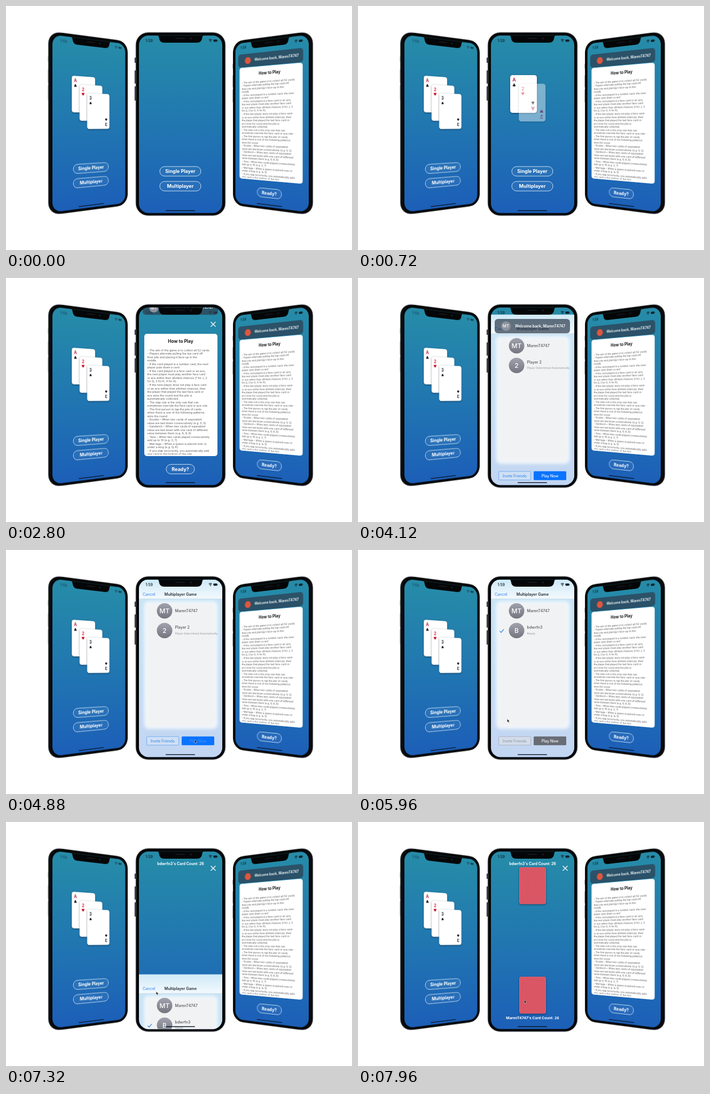
Write an HTML page that moves like this. It is 648x459 px and loops after 8000 ms.

```html
<!DOCTYPE html>
<html lang="en">
<head>
<meta charset="utf-8">
<title>Card game on three phones</title>
<style>
  html, body { margin: 0; width: 100%; height: 100%; overflow: hidden; background: #fff; }
  svg { position: absolute; left: 0; top: 0; width: 168px; height: 344px; overflow: visible; transform-origin: 0 0; }
  text { font-family: Inter, sans-serif; white-space: pre; }
  .suit { font-family: "DejaVu Sans", sans-serif; }
  .card { filter: drop-shadow(.5px 1px 1.8px rgba(0, 15, 40, .6)); }
</style>
</head>
<body>
<script>
const LOOP = 8000;
const USER = 'MarenT4747', RIVAL = 'bdwrfn3';
const RULES = `- The aim of the game is to collect all 52 cards.
- Players alternate pulling the top card off
their pile and placing it face-up in the
middle
- If the card played is a number card, the next
player puts down a card.
- If the card played is a face card or an ace,
the next player must play another face card
or ace within their allotted chances (1 for J, 2
for Q, 3 for K, 4 for A).
- If the next player does not play a face card
or an ace within their allotted chances, then
the player that played the last face card or
ace wins the round and the pile is
automatically collected.
- The slap rule is the only rule that can
sometimes override the face card or ace rule.
- The first person to tap the pile of cards
when there is one of the following patterns
wins the round:
- Double – When two cards of equivalent
value are laid down consecutively (e.g. 5, 5)
- Sandwich – When two cards of equivalent
value are laid down with one card of different
value between them (e.g. 6, 8, 6)
- Tens – When two cards played consecutively
add up to 10 (e.g. 3, 7)
- Marriage – When a queen is placed over or
under a king (e.g. Q, K)
- If you slap incorrectly, you automatically add
one card to the bottom of the pile`.split('\n');

// Drawing helpers. All screens share the coordinates of the middle phone.
const text = (x, y, size, str, fill = '#fff', weight = 400, anchor = 'middle', extra = '') =>
  `<text x="${x}" y="${y}" font-size="${size}" fill="${fill}" font-weight="${weight}" text-anchor="${anchor}" ${extra}>${str}</text>`;
const rect = (x, y, w, h, r, fill, extra = '') =>
  `<rect x="${x}" y="${y}" width="${w}" height="${h}" rx="${r}" fill="${fill}" ${extra}/>`;
const group = (id, content) => `<g id="${id}">${content}</g>`;
const lowered = (dy, content) => `<g transform="translate(0 ${dy})">${content}</g>`;

const pill = (cy, w, label, size) =>
  rect(326.5 - w / 2, cy - 9, w, 18, 9, '#fff', 'fill-opacity=".05" stroke="#dcecfa" stroke-width=".9"') +
  text(326.5, cy + 3.1, size, label, '#fff', 700);

function card(i, rank, suit, rankColor, suitColor) {
  const x = 285 + 16.2 * i, y = 130 + 16.3 * i;
  const mark = text(x + 7.5, y + 12.3, 8.8, rank, rankColor, 600) +
    text(x + 7.5, y + 22, 8.2, suit, suitColor, 400, 'middle', 'class="suit"');
  return `<g class="card">${rect(x, y, 50, 71, 4.5, '#fff')}${mark}
    <g transform="rotate(180 ${x + 25} ${y + 35.5})">${mark}</g></g>`;
}
const cards = [
  card(0, 'A', '♣', '#b01c38', '#111'),
  card(1, '2', '♥', '#c8142f', '#d0142e'),
  card(2, '3', '♠', '#15202a', '#111')
];
const menuButtons = pill(311, 77, 'Single Player', 8.9) + pill(339, 77, 'Multiplayer', 9);

const closeIcon = '<path d="M383.5 82.5l9 9m0-9l-9 9" stroke="#fff" stroke-width="1.3"/>';
const rules = rect(259, 105, 137, 230, 5, '#fff') +
  text(327, 122.3, 8.3, 'How to Play', '#1c1c1e', 700) +
  `<g clip-path="url(#page)">` +
  RULES.map((line, i) => text(264.6, 137.8 + 6.52 * i, 5.3, line, '#58585c', 400, 'start')).join('') +
  '</g>' + pill(359.5, 53, 'Ready?', 9);

const banner = icon => rect(256, 77, 141, 27, 6, '#2f3d4f', 'fill-opacity=".72"') + icon +
  text(294, 92.8, 6.9, `Welcome back, ${USER}`, '#fff', 600, 'start');
const smallAvatar = '<circle cx="277" cy="90.5" r="9" fill="#8d929c"/>' + text(277, 93.3, 7.6, 'MT', '#fff', 500);
const plainBadge = '<circle cx="278.5" cy="91" r="7" fill="#e0563c"/>';

const avatar = (cy, label, id) => `<circle cx="297" cy="${cy}" r="14.5" fill="url(#grey)"/>` +
  text(297, cy + 4.3, 12, label, '#fff', 500, 'middle', `id="${id}"`);
const lobby = rect(249, 56, 156, 334, 0, 'url(#haze)') +
  rect(261, 99, 133, 235, 6, '#f1f2f3', 'stroke="#f8fcff" stroke-width="4" filter="url(#soft)"') +
  rect(249, 56, 156, 36, 0, 'url(#nav)') +
  rect(249, 91.7, 156, .5, 0, '#b4c6d6') +
  text(256, 85.5, 7.2, 'Cancel', '#2f82e8', 400, 'start') +
  text(327, 85.5, 7.1, 'Multiplayer Game', '#22282e', 600) +
  avatar(114.5, 'MT', 'hostInitials') + avatar(151.5, '2', 'guestInitials') +
  text(316.5, 117, 7.1, USER, '#54565a', 500, 'start') +
  text(316.5, 148, 7.1, '', '#54565a', 500, 'start', 'id="guestName"') +
  text(316.5, 158.5, 5.2, '', '#96989d', 400, 'start', 'id="guestNote"') +
  '<path id="check" d="M265.5 152.5l2.5 2.6 5-6" fill="none" stroke="#277ff0" stroke-width="1.3"/>' +
  rect(263.5, 351, 60, 16, 1.5, '#cfe0f5', 'id="inviteBox" stroke-width=".8"') +
  text(293.5, 361.7, 7.1, 'Invite Friends', '#2f82e8', 400, 'middle', 'id="inviteText"') +
  rect(329, 350.7, 61, 16.6, 1.5, '#0a73ff', 'id="playBox"') +
  text(359.5, 361.7, 7.1, 'Play Now', '#fff', 500, 'middle', 'id="playText"');

const cardBack = y => `<g class="card">${rect(302, y, 50, 69.5, 4, '#dd7780')}
  ${rect(302.6, y + .6, 48.8, 68.3, 3.5, 'url(#dots)')}</g>`;
const game = text(327, 81.3, 6.9, `${RIVAL}'s Card Count: 26`, '#fff', 700) +
  text(327, 370.5, 6.8, `${USER}'s Card Count: 26`, '#fff', 700) +
  closeIcon + group('piles', cardBack(85) + cardBack(291));

const status = text(268, 67.6, 7, '1:59', '#10222f', 500) +
  `<g fill="none" stroke="#10222f" stroke-width="1.1"><path d="M379.8 64.2q3-2.6 6 0M381.2 65.8q1.6-1.3 3.2 0"/></g>
   <circle cx="382.8" cy="67.2" r=".8" fill="#10222f"/>` +
  rect(388.5, 63, 7, 4.2, 1.2, '#10222f') + rect(396, 64.4, .8, 1.4, .3, '#10222f');
const notch = `<path d="M282 55q4 0 4.5 4.5q1 9.5 10 9.5h61q9 0 10-9.5q.5-4.5 4.5-4.5z" fill="#050607"/>
  <circle cx="346" cy="61" r="1.6" fill="#16233a"/>` + rect(317, 60, 18, 1.6, .8, '#1b1d20');
const homeBar = rect(299, 384, 55, 1.8, .9, '#0b1424', 'fill-opacity=".82"');

// side: -1 shows the left flank, 1 the right flank, 0 a frontal phone
function phone(content, side, transform) {
  const keys = [[97, 10], [121, 25], [151, 27]].map(([y, h]) =>
    rect(side > 0 ? 242 : side < 0 ? 237 : 241, y, 2, h, .8, side ? '#a9adb4' : '#15171a')).join('');
  const flank = side ? rect(243 + 5 * side, 49.8, 168, 344.4, 23, '#0c0d0f', 'stroke="#a4a8ae" stroke-width=".7"') : '';
  const body = rect(243.1, 49.8, 167.8, 344.4, 23, '#060708', side ? '' : 'stroke="#85898f" stroke-width=".9"');
  // The bezel looks thinner on the flank's side
  const screenX = side < 0 ? 246 : 249, screenWidth = side ? 159 : 156;
  document.body.insertAdjacentHTML('beforeend', `<svg viewBox="243 50 168 344" style="transform:${transform}">
    <clipPath id="screen${side}">${rect(screenX, 55.5, screenWidth, 334, 18, '#000')}</clipPath>
    ${keys}${flank}${body}
    <g clip-path="url(#screen${side})">${rect(screenX, 55, screenWidth, 336, 0, 'url(#sea)')}${content}${notch}${homeBar}</g>
    ${side ? '' : group('pointer', '<path d="M0 0v5.8l1.4-1.2 1 2.3 1.1-.5-1-2.2h1.9z" fill="#111" stroke="#fff" stroke-width=".4"/>')}
  </svg>`);
}

// Perspective of a phone turned about its vertical axis
function turned(left, right, leftHeight, rightHeight, midY = 220.5) {
  const a = 344 / leftHeight, b = 344 / rightHeight, dw = (b - a) / 168;
  return `matrix3d(${[(right * b - left * a) / 168, midY * dw, 0, dw, 0, 1, 0, 0,
    0, 0, 1, 0, left * a, midY * a - 172, 0, a].join()})`;
}

document.body.insertAdjacentHTML('beforeend', `<svg><defs>
  <linearGradient id="sea" gradientUnits="userSpaceOnUse" x1="0" y1="56" x2="0" y2="390">
    <stop stop-color="#268ca8"/><stop offset=".5" stop-color="#2177b0"/><stop offset="1" stop-color="#1c5fb8"/></linearGradient>
  <linearGradient id="haze" x1="0" y1="0" x2="0" y2="1">
    <stop stop-color="#c9e6f5"/><stop offset="1" stop-color="#c2d5f2"/></linearGradient>
  <linearGradient id="nav" x1="0" y1="0" x2="0" y2="1">
    <stop stop-color="#cfeaf7"/><stop offset="1" stop-color="#f3f9fd"/></linearGradient>
  <linearGradient id="grey" x1="0" y1="0" x2="0" y2="1">
    <stop stop-color="#a0a3ad"/><stop offset="1" stop-color="#73767f"/></linearGradient>
  <filter id="soft" x="-10%" y="-10%" width="120%" height="120%"><feGaussianBlur stdDeviation="3"/></filter>
  <pattern id="dots" width="3.4" height="3.4" patternUnits="userSpaceOnUse">
    <rect width="3.4" height="3.4" fill="#d23a4c"/><g fill="#f0a9ae"><circle cx=".85" cy=".85" r=".72"/><circle cx="2.55" cy="2.55" r=".72"/></g></pattern>
  <clipPath id="page">${rect(259, 128, 137, 204.5, 0, '#000')}</clipPath>
</defs></svg>`);

phone(cards.join('') + menuButtons + `<g opacity=".6">${status}</g>`, -1, turned(84, 228, 345, 307));
phone(lowered(2, rules + banner(plainBadge)) + status, 1, turned(425, 570, 307, 345));
phone(group('menu', cards.map((c, i) => group('card' + i, c)).join('') + menuButtons) +
  group('howTo', closeIcon + rules) + group('game', game) + group('lobby', lobby) + status +
  group('banner', banner(smallAvatar)), 0, 'translate(243px, 50px)');

const $ = id => document.getElementById(id);
const ramp = (t, start, length) => Math.min(1, Math.max(0, (t - start) / length));
const easeOut = p => 1 - (1 - p) ** 3;
const smooth = p => p * p * (3 - 2 * p);
const set = (id, attrs) => { for (const k in attrs) $(id).setAttribute(k, attrs[k]); };
const fade = (id, opacity) => set(id, { opacity });
const shift = (id, x, y) => set(id, { transform: `translate(${x} ${y})` });

const POINTER = [[4550, 372, 330], [4800, 353.5, 357], [5100, 353.5, 357], [5700, 279.5, 318],
  [7250, 279.5, 318], [7750, 311.5, 335]];

function render(t) {
  for (let i = 0; i < 3; i++) fade('card' + i, ramp(t, 300 + 300 * i, 300));
  const opened = smooth(ramp(t, 2000, 450));
  fade('menu', 1 - opened);
  fade('howTo', t < 4400 ? opened : 0);
  fade('game', t < 4400 ? 0 : 1);
  fade('piles', ramp(t, 7350, 250));

  const rise = easeOut(ramp(t, 3800, 485)), drop = smooth(ramp(t, 7050, 430));
  shift('lobby', 0, 334 * (1 - rise + drop));
  shift('banner', 0, -48 * (1 - easeOut(ramp(t, 2760, 400)) + smooth(ramp(t, 4350, 350))));

  const joined = t >= 5900, waiting = t >= 5040;
  $('guestInitials').textContent = joined ? 'B' : '2';
  $('guestName').textContent = joined ? RIVAL : 'Player 2';
  $('guestNote').textContent = joined ? 'Ready' : 'Player Determined Automatically';
  fade('check', joined ? 1 : 0);
  set('inviteBox', { stroke: waiting ? '#a3a9b2' : '#5f9fee', fill: waiting ? '#d3dcea' : '#cfe0f5' });
  set('inviteText', { fill: waiting ? '#8c929b' : '#2f82e8' });
  set('playBox', { fill: waiting ? '#686d75' : '#0a73ff' });
  fade('playText', 1 - .8 * (ramp(t, 4780, 60) - ramp(t, 4980, 60)));

  let [, x, y] = POINTER[0];
  POINTER.slice(1).forEach(([end, nx, ny], i) => {
    const p = smooth(ramp(t, POINTER[i][0], end - POINTER[i][0]));
    x += (nx - x) * p;
    y += (ny - y) * p;
  });
  shift('pointer', x, y);
  fade('pointer', t >= POINTER[0][0] ? 1 : 0);
}

const start = performance.now();
function tick() {
  render((performance.now() - start) % LOOP);
  requestAnimationFrame(tick);
}
tick();
</script>
</body>
</html>
```
